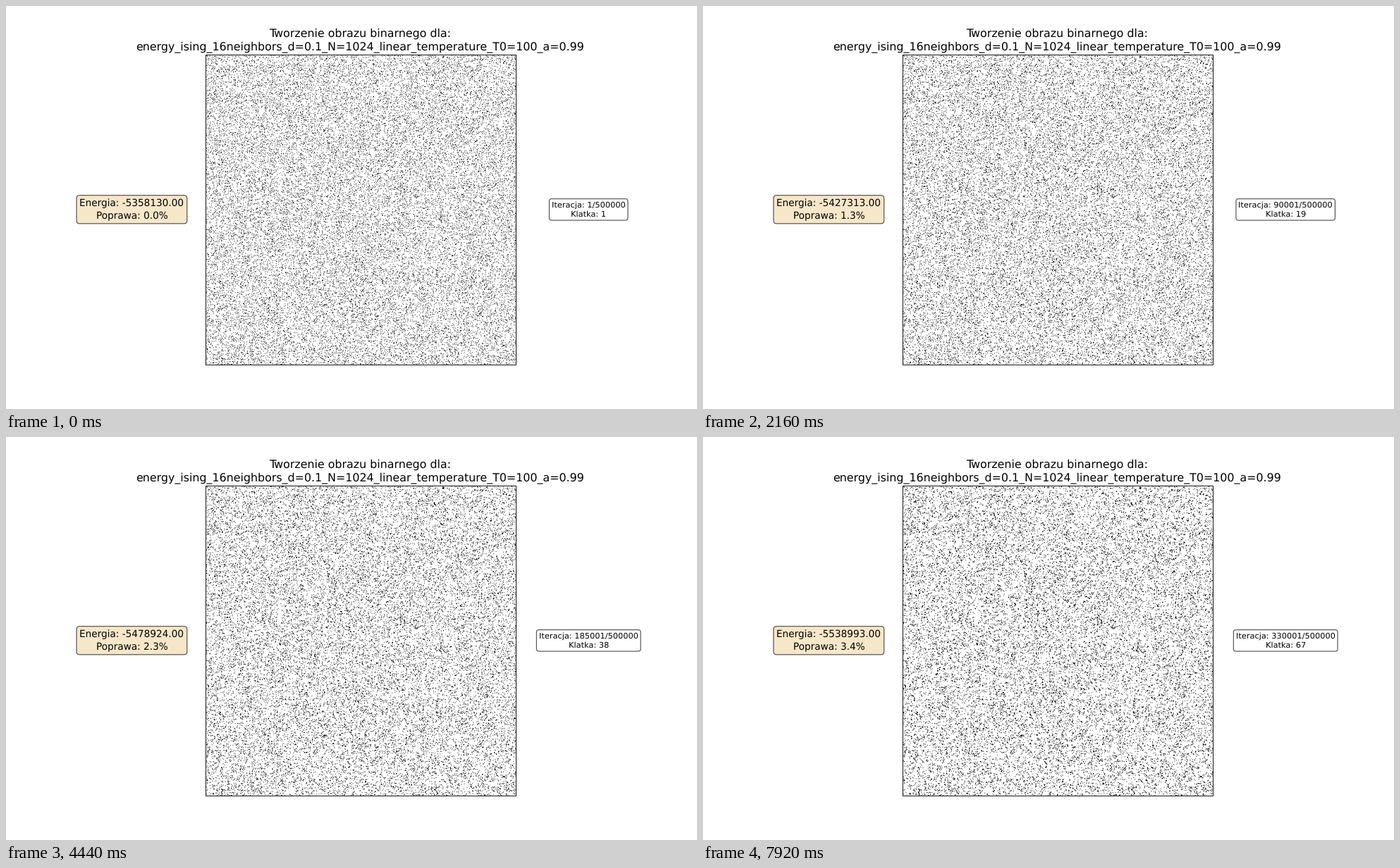
Write a matplotlib script that moves like this. It is 980 px wide and 572 px high and loops after 8 s.

```python
import numpy as np
import matplotlib.pyplot as plt
from matplotlib.animation import FuncAnimation
from matplotlib.patches import Rectangle

W, H, DPI = 980, 572, 80
K = W / 12 / DPI            # point scale of a 12 inch wide layout
N, GRID, SIDE = 1024, 539, 440   # lattice, sampled cells, size on screen
STATES, STEP, TOTAL = 67, 5000, 500000
HOLD = 3                    # ticks of 40 ms per state
PAIRS = 9000                # swap attempts between two states

plt.rcParams["font.family"] = "DejaVu Sans"
plt.rcParams["text.hinting"] = "none"

# the 16 cells of the square ring at distance 2
RING = [(dy, dx) for dy in range(-2, 3) for dx in range(-2, 3)
        if max(abs(dy), abs(dx)) == 2]


def neighbours(grid, y, x):
    return sum(grid[(y + dy) % N, (x + dx) % N].astype(int) for dy, dx in RING)


def anneal():
    """Swap black and white cells when it lowers the energy."""
    rng = np.random.default_rng(7)
    grid = rng.random((N, N)) < 0.1
    pick = ((np.arange(GRID) + 0.5) * N / GRID).astype(int)
    shots = []
    for _ in range(STATES):
        shots.append(~grid[np.ix_(pick, pick)])
        ya, xa, yb, xb = rng.integers(0, N, (4, PAIRS))
        ok = grid[ya, xa] != grid[yb, xb]
        ya, xa, yb, xb = ya[ok], xa[ok], yb[ok], xb[ok]
        gain = neighbours(grid, yb, xb) - neighbours(grid, ya, xa)
        ok = np.where(grid[ya, xa], gain, -gain) > 0
        ya, xa, yb, xb = ya[ok], xa[ok], yb[ok], xb[ok]
        grid[ya, xa], grid[yb, xb] = grid[yb, xb], grid[ya, xa]
    return shots


def energy_curve():
    """Smooth cubic through a few measured energies."""
    t = np.array([0, 6, 18, 27, 37, 46, 66], float)
    e = np.array([5358130, 5384599, 5427313, 5453556,
                  5478924, 5499581, 5538993], float)
    m = np.gradient(e, t, edge_order=2)
    s = np.arange(STATES)
    i = np.clip(np.searchsorted(t, s, side="right") - 1, 0, len(t) - 2)
    h = t[i + 1] - t[i]
    u = (s - t[i]) / h
    curve = ((1 + 2 * u) * (1 - u) ** 2 * e[i] + u * (1 - u) ** 2 * h * m[i]
             + u * u * (3 - 2 * u) * e[i + 1] + u * u * (u - 1) * h * m[i + 1])
    return -np.round(curve)


shots = anneal()
energy = energy_curve()

fig = plt.figure(figsize=(12.25, 7.15), dpi=DPI, facecolor="white")


def label(x, y, size, spacing, text="", va="center", **kw):
    return fig.text(x / W, 1 - y / H, text, fontsize=size * K, ha="center",
                    va=va, linespacing=spacing, **kw)


def box(color, pad):
    return dict(boxstyle=f"round,pad={pad}", facecolor=color, alpha=0.7,
                linewidth=K)


# soft resampling of the sampled cells; overshoot clips to white
ax = fig.add_axes([283 / W, 63 / H, SIDE / W, SIDE / H])
ax.axis("off")
picture = ax.imshow(shots[0].astype(float), cmap="gray", vmin=0, vmax=1,
                    interpolation="lanczos", filterrad=3, aspect="auto")
fig.add_artist(Rectangle((283.5, 62.5), SIDE, SIDE, transform=None, fill=False,
                         edgecolor="black", linewidth=0.8 * K, snap=False,
                         zorder=5))

label(502, 62, 14, 1.215, "Tworzenie obrazu binarnego dla:\n"
      "energy_ising_16neighbors_d=0.1_N=1024_linear_temperature_T0=100_a=0.99",
      va="baseline")
left = label(178.4, 288.8, 12, 1.41, bbox=box("wheat", 0.32))
right = label(826.2, 288.9, 10, 1.28, bbox=box("white", 0.3))


def draw(tick):
    s = min(tick // HOLD, STATES - 1)
    better = (energy[s] / energy[0] - 1) * 100
    picture.set_data(shots[s].astype(float))
    left.set_text(f"Energia: {energy[s]:.2f}\nPoprawa: {better:.1f}%")
    right.set_text(f"Iteracja: {s * STEP + 1}/{TOTAL}\nKlatka: {s + 1}")
    return picture, left, right


anim = FuncAnimation(fig, draw, frames=200, interval=40, repeat=True,
                     repeat_delay=0, blit=False)
plt.show()
```
